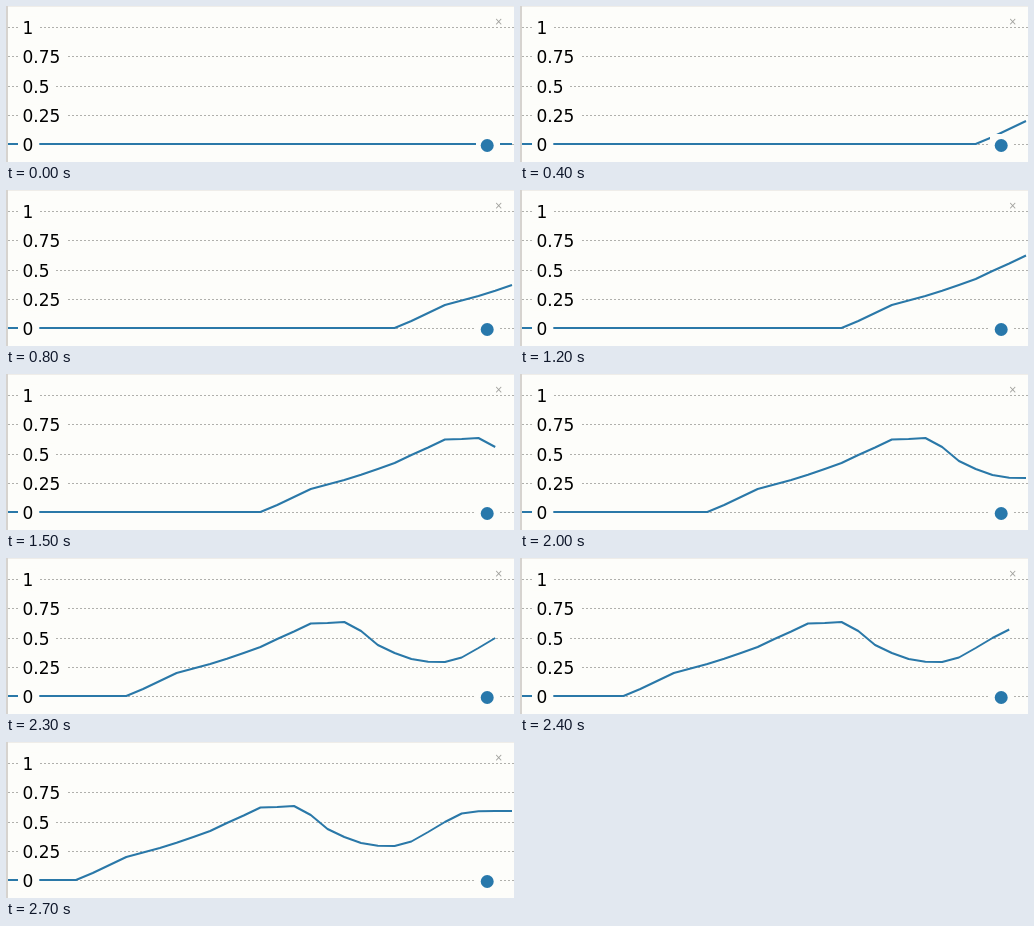
Write an HTML page that moves like this. It is 508x156 px and loops after 2.8 s.

```html
<!DOCTYPE html>
<html lang="en">
<head>
<meta charset="utf-8">
<title>Live line chart</title>
<style>
html, body { margin: 0; width: 100%; height: 100%; overflow: hidden; background: #fdfdfa; }
svg { display: block; font: 17px "DejaVu Sans", sans-serif; }
.grid { stroke: #b0b0ac; stroke-dasharray: 2 2; }
.mask { fill: #fdfdfa; }
#line { fill: none; stroke: #2a78a8; stroke-width: 2; stroke-linejoin: round; }
</style>
</head>
<body>
<svg width="508" height="156" viewBox="0 0 508 156">
  <rect width="508" height="1" fill="#efede9"/>
  <rect width="2" height="156" fill="#d6d3cf"/>
  <g id="grid"></g>
  <polyline id="line"/>
  <g id="labels"></g>
  <rect class="mask" x="470" y="128" width="24" height="22"/>
  <circle cx="481.2" cy="139.5" r="6.5" fill="#2878ab"/>
  <text x="488.5" y="19" font-size="10" fill="#a0a09c">×</text>
</svg>
<script>
const FRAME = 100, FRAMES = 28, STEP = 16.77, RIGHT = 506, ZERO = 138;
// Heights of the samples in pixels, starting where the curve leaves zero
const samples = [138, 131, 123, 115, 110.5, 106, 100.8, 95, 89, 81, 73.5, 65.5, 65,
  64, 73, 87, 95, 101, 103.8, 104, 99.5, 90, 80, 71.5, 69.2, 69, 69];
const byId = id => document.getElementById(id);

[["1", 21.5], ["0.75", 50.5], ["0.5", 80.5], ["0.25", 109.5], ["0", 138.5]].forEach(([text, y]) => {
  const width = [...text].reduce((w, c) => w + (c === "." ? 5.4 : 10.8), 10.5);
  byId("grid").innerHTML += `<path class="grid" d="M2 ${y}H508"/>`;
  byId("labels").innerHTML += `<rect class="mask" x="12" y="${y - 11}" width="${width}" height="22"/>
    <text x="16.5" y="${y + 6}">${text}</text>`;
});

// Scrolling moves two samples at a time; a few frames are held
function draw(now) {
  let i = Math.floor(now / FRAME) % FRAMES;
  if ([14, 22, 25].includes(i)) i--;
  const last = i - 1;
  const lag = i < 24 ? i % 2 : 1 - i % 2;
  let points = `2,${ZERO}`;
  for (let k = -1; k <= last; k++) {
    points += ` ${RIGHT - (last + lag - k) * STEP},${samples[k] ?? ZERO}`;
  }
  byId("line").setAttribute("points", points);
}

const start = performance.now();
function tick() {
  draw(performance.now() - start);
  requestAnimationFrame(tick);
}
tick();
</script>
</body>
</html>
```
